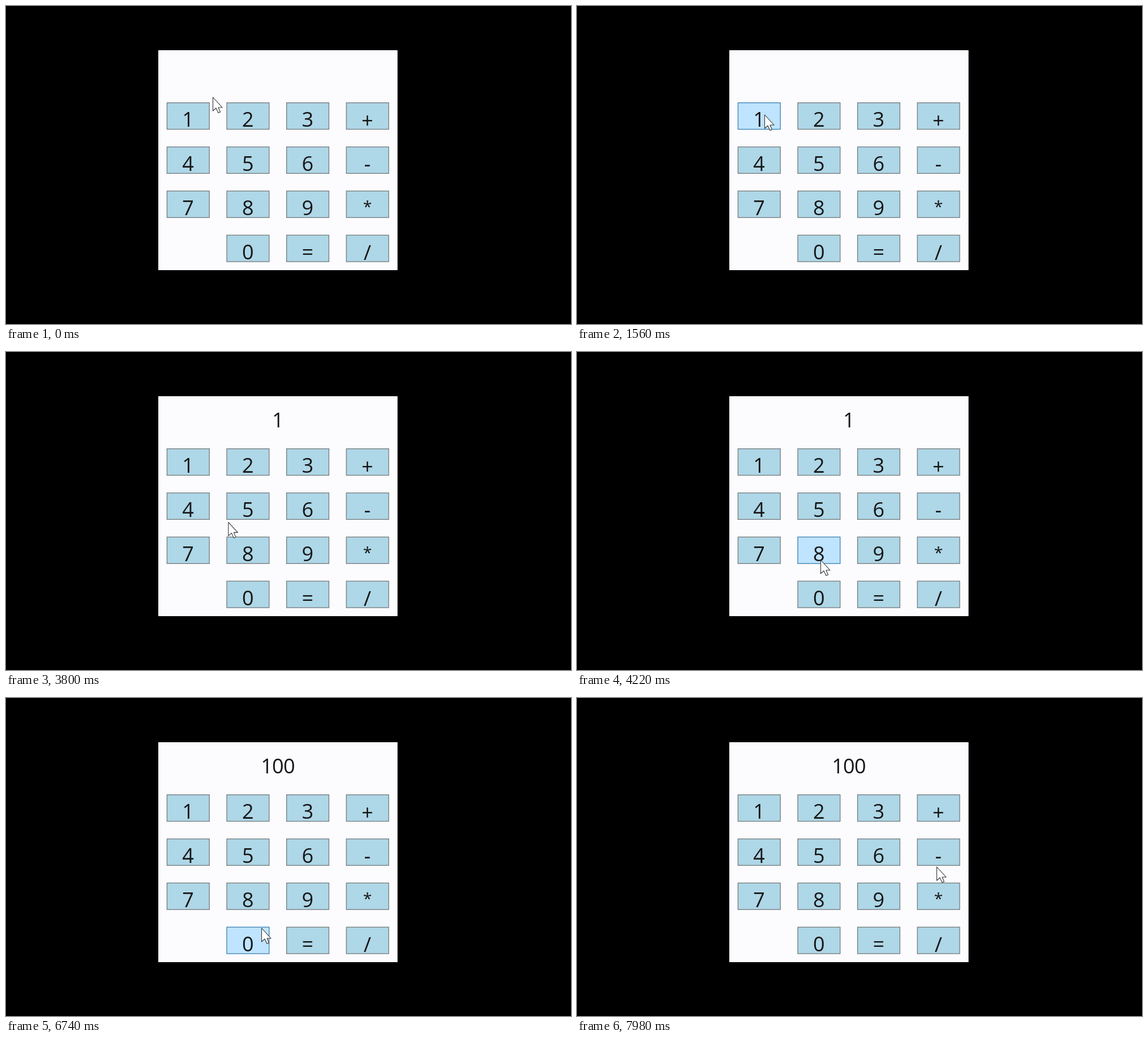
Animation, 998 px wide and 561 px high, one loop 8 s. Source, as an HTML page:

```html
<!DOCTYPE html>
<html lang="en">
<head>
<meta charset="utf-8">
<title>Calculator</title>
<style>
  html, body { margin: 0; width: 100%; height: 100%; overflow: hidden; background: #000; }
  svg { display: block; width: 100vw; height: 100vh; }
  text { font: 36px "Open Sans", "Noto Sans", sans-serif; letter-spacing: -0.8px; text-anchor: middle; fill: #161616; }
  .key { fill: #aed7e7; stroke: #757a7c; stroke-width: 1.3; }
  .key.hover { fill: #bee4ff; stroke: #3c7fb1; }
  .key.pressed { fill: #c4e3fa; stroke: #2c628b; }
</style>
</head>
<body>
<svg viewBox="0 0 998 561">
  <rect x="269" y="78" width="422.6" height="388" fill="#fcfcff"/>
  <text id="display" x="480" y="133"></text>
  <g id="keys"></g>
  <path id="pointer" d="M.5 1V25L6 20L10 28.5L13.5 27L10 19H17Z"
        fill="#fff" stroke="#333" stroke-width="1.1" stroke-linejoin="round"/>
</svg>
<script>
const LOOP = 8000;
const LAYOUT = ['123+', '456-', '789*', ' 0=/'];
const KEY = { left: 284.4, top: 170.7, stepX: 105.6, stepY: 77.85, width: 74.8, height: 46.8, baseline: 42.6 };
const NUDGE = { '+': 2, '*': -5, '/': 1 };

const RESULT = '100';
const RELEASES = [2760, 5180, 6020];
const HOLD = 130;

const REST = { x: 365, y: 160 };
const MOVES = [
  { from: 20, to: 1150, x: 331, y: 191 },
  { from: 3360, to: 4120, x: 430, y: 366 },
  { from: 4220, to: 4640, x: 411, y: 411 },
  { from: 6200, to: 6640, x: 451, y: 405 },
  { from: 6840, to: 7400, x: 640, y: 343 },
  { from: 7540, to: 7960, x: 635, y: 297 }
];

const display = document.getElementById('display');
const pointer = document.getElementById('pointer');
const keyLayer = document.getElementById('keys');

function addSvg(tag, attributes) {
  const node = document.createElementNS('http://www.w3.org/2000/svg', tag);
  for (const name in attributes) node.setAttribute(name, attributes[name]);
  return keyLayer.appendChild(node);
}

const keys = [];
LAYOUT.forEach((labels, row) => [...labels].forEach((label, column) => {
  if (label === ' ') return;
  const x = KEY.left + column * KEY.stepX, y = KEY.top + row * KEY.stepY;
  const rect = addSvg('rect', { x, y, width: KEY.width, height: KEY.height });
  const text = addSvg('text', { x: x + KEY.width / 2 - 0.6, y: y + KEY.baseline + (NUDGE[label] || 0) });
  text.textContent = label;
  if (label === '*') text.style.fontSize = '28px';
  keys.push({ rect, x, y });
}));

const smooth = u => u * u * (3 - 2 * u);

function pointerAt(time) {
  let { x, y } = REST;
  for (const move of MOVES) {
    const u = Math.min(1, Math.max(0, (time - move.from) / (move.to - move.from)));
    x += (move.x - x) * smooth(u);
    y += (move.y - y) * smooth(u);
  }
  return { x, y };
}

function render(time) {
  const tip = pointerAt(time);
  const down = RELEASES.some(release => time >= release - HOLD && time < release);
  const digits = RELEASES.filter(release => time >= release).length;
  pointer.setAttribute('transform', `translate(${tip.x} ${tip.y})`);
  display.textContent = RESULT.slice(0, digits);
  for (const { rect, x, y } of keys) {
    const over = tip.x >= x && tip.x <= x + KEY.width && tip.y >= y && tip.y <= y + KEY.height;
    rect.setAttribute('class', over ? (down ? 'key pressed' : 'key hover') : 'key');
  }
}

const start = performance.now();
function tick() {
  render((performance.now() - start) % LOOP);
  requestAnimationFrame(tick);
}
tick();
</script>
</body>
</html>
```
